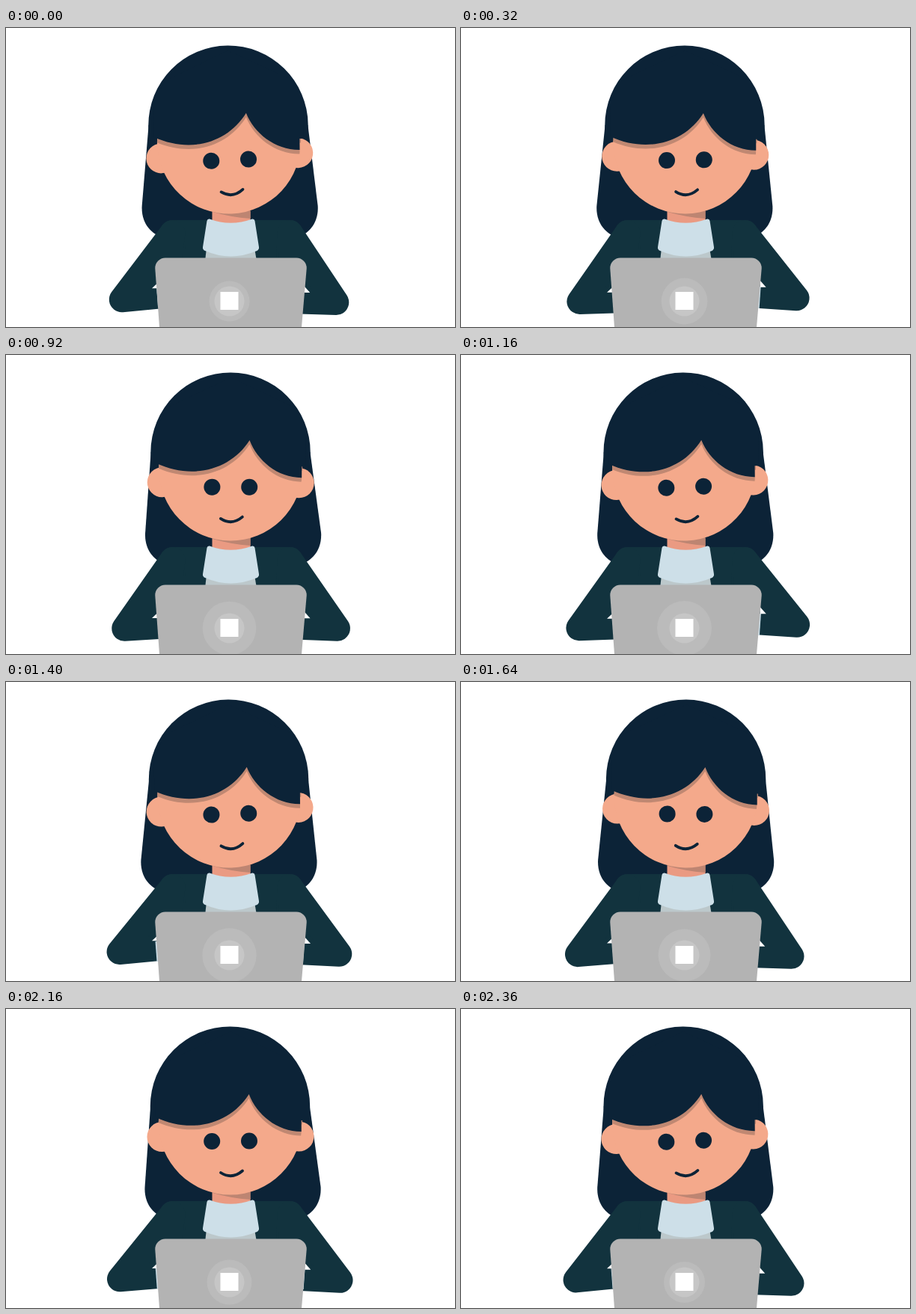
Write an HTML page that moves like this. It is 600 by 400 pixels and loops after 2.4 s.

```html
<!DOCTYPE html>
<html lang="en">
<head>
<meta charset="utf-8">
<title>Typing at a laptop</title>
<style>
  html, body { margin: 0; height: 100%; overflow: hidden; background: #fff; }
  svg { display: block; width: 600px; height: 400px; }
  .hair { fill: #0c2337; }
  .skin { fill: #f4a98b; }
  .jacket { fill: #12333e; stroke: #12333e; stroke-width: 34; stroke-linejoin: round; }
  .shirt { fill: #cddfe8; }
</style>
</head>
<body>
<svg viewBox="0 0 600 400">
  <defs>
    <clipPath id="faceClip"><circle id="face" cx="299.8" cy="152.5" r="96"/></clipPath>
    <path id="fringe"/>
  </defs>

  <path id="backHair" class="hair"/>

  <path class="jacket" d="M222.5 274H379.5L375 380H225Z"/>
  <path id="leftArm" class="jacket"/>
  <path id="rightArm" class="jacket"/>
  <path id="leftCuff" class="shirt" d="M201.5 347L203.5 374H215V347Z"/>
  <path id="rightCuff" class="shirt" d="M399 346L397 375H385V346Z"/>
  <path id="leftGap" fill="#fff" d="M195 350L203 342.500V350Z"/>
  <path id="rightGap" fill="#fff" d="M407 350L399 341V350Z"/>

  <path fill="#ea9a82" d="M275.5 245H326.5V264H275.5Z"/>
  <path fill="#bd8572" d="M276 240H326.5V255Q300 253 276 246Z"/>
  <path fill="#bcc8cb" d="M268 294H332L335 312H266Z"/>
  <path class="shirt" d="M272 255.5Q300 266 329 255.5Q332 255 332.5 258L338 293Q338.5 296 335.5 298Q300 313 266 298Q262.5 296.5 263 293L268.5 258Q269 255 272 255.5Z"/>

  <g class="hairSwing"><circle class="hair" cx="299.5" cy="130.2" r="106.7"/></g>
  <g class="headTilt skin">
    <circle cx="208.5" cy="171" r="20"/>
    <circle cx="391.5" cy="170.5" r="20"/>
    <use href="#face"/>
  </g>
  <g class="headTilt" clip-path="url(#faceClip)">
    <g id="shadow"><use href="#fringe" y="5.5" fill="#c08872"/></g>
  </g>
  <g class="hairSwing"><use href="#fringe" class="hair"/></g>
  <g class="headTilt">
    <circle class="hair" cx="275.2" cy="176.9" r="11"/>
    <circle class="hair" cx="325" cy="176.5" r="11"/>
    <path fill="none" stroke="#0c2337" stroke-width="3.8" stroke-linecap="round" d="M287 219Q302 228.500 316 216.500"/>
  </g>

  <path fill="#b3b3b3" d="M213 307.5H388A13.8 13.8 0 0 1 401.7 322L395 400H205L199.3 322A13.8 13.8 0 0 1 213 307.5Z"/>
  <circle id="glow" cx="298.5" cy="365.5" fill="#bbb"/>
  <circle cx="298.5" cy="365.5" r="20" fill="#c6c6c6"/>
  <rect x="286.5" y="353" width="24" height="24" fill="#fff"/>
</svg>
<script>
  const LOOP = 2400;
  const el = id => document.getElementById(id);
  const transform = (selector, value) =>
    document.querySelectorAll(selector).forEach(node => node.setAttribute('transform', value));
  const shape = (id, d) => el(id).setAttribute('d', d);
  // Swings between -1 and 1, lowest at time `low`.
  const swing = (t, period, low) => -Math.cos((t - low) / period * 2 * Math.PI);

  function draw(now) {
    const t = now % LOOP;
    const tilt = swing(t, 1200, 60);
    const left = swing(t, 800, 625);
    const leftHand = swing(t, 800, 655);
    const right = swing(t, 800, 0);

    // The hair slides more than it turns; the face turns.
    const turnFace = `rotate(${2.2 * tilt} 300.2 203)`;
    const moveHair = `translate(${1.9 * tilt} 0) rotate(${0.6 * tilt} 300.2 203)`;
    transform('.headTilt', turnFace);
    transform('.hairSwing', moveHair);
    transform('#shadow', `rotate(${-2.2 * tilt} 300.2 203) ${moveHair}`);

    const tip = 324.7 + 1.2 * tilt;
    shape('fringe',
      `M200 145C250 168 ${tip - 24.7} 153 ${tip} 114C${tip + 10.3} 141 362 164 394.7 164` +
      'V149H400V100L385 70L300 30L215 70L200 100Z');

    // The loose ends of the hair follow the head with a delay.
    const top = 299.5 + 2.6 * tilt;
    const end = 301.2 + 3.3 * swing(t, 1200, 175);
    shape('backHair',
      `M${top - 106.4} 130L${end - 117.5} 238C${end - 119} 262 ${end - 103} 281 ${end - 80} 281` +
      `H${end + 80}C${end + 103} 281 ${end + 119} 262 ${end + 117.5} 238L${top + 106.4} 130Z`);

    shape('leftArm',
      `M222.5 274L${155.5 + 4 * left} ${363.8 + 2.9 * left}L212 ${360 + 5 * leftHand}Z`);
    shape('rightArm',
      `M379.5 274L${445.3 + 4 * right} ${363.8 - 3.2 * right}L385 ${360.8 - 4.5 * right}Z`);
    transform('#leftCuff', `translate(${2 * left} 0)`);
    transform('#rightCuff', `translate(${2 * right} 0)`);
    transform('#leftGap', `translate(0 ${4.2 * leftHand})`);
    transform('#rightGap', `translate(${0.8 * right} ${-4 * right})`);

    el('glow').setAttribute('r', 27 + 9.5 * Math.sin(Math.PI * t / LOOP));
  }

  function frame() {
    draw(performance.now());
    requestAnimationFrame(frame);
  }
  frame();
</script>
</body>
</html>
```
